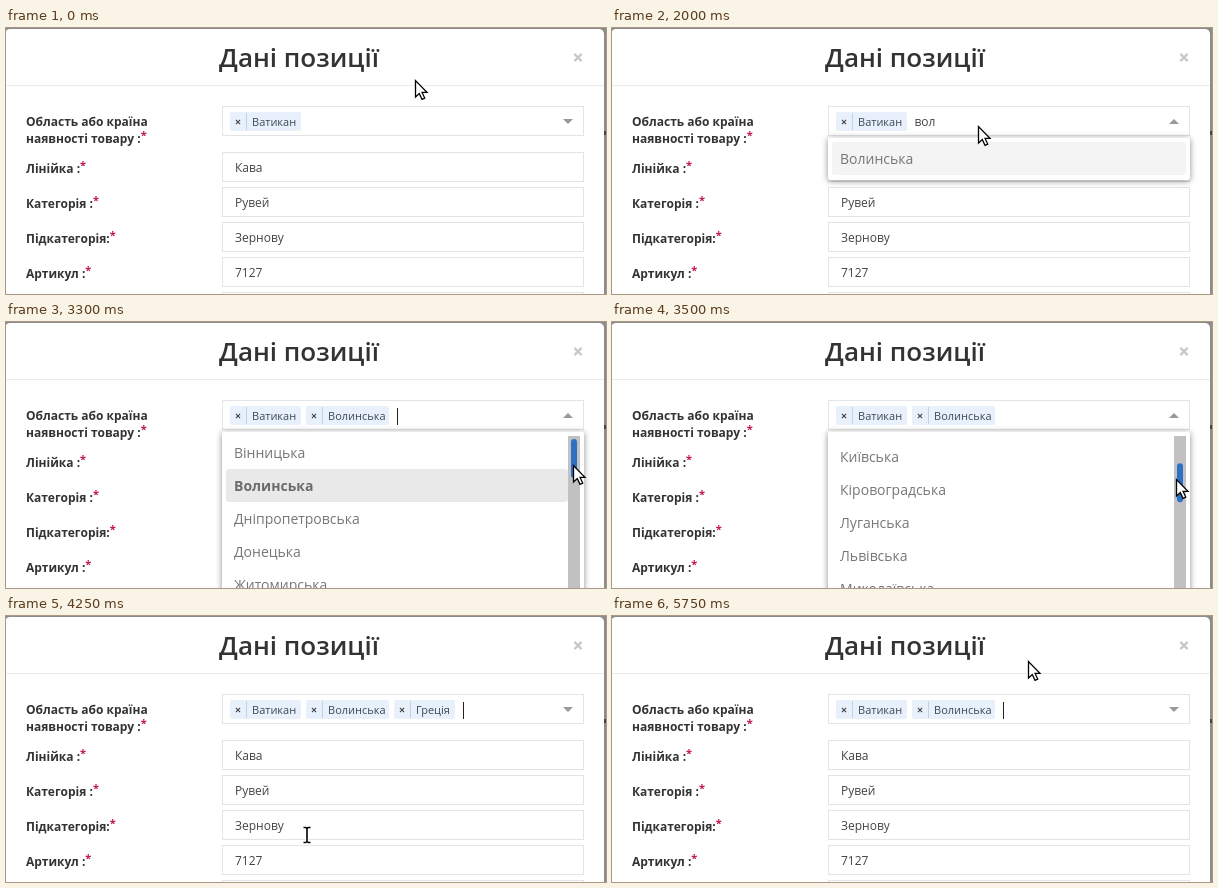
These frames come from a looping animation (600x266 px, 5.95 s). An HTML page:

```html
<!DOCTYPE html>
<html lang="uk">
<head>
<meta charset="utf-8">
<style>
  html, body { margin: 0; width: 100%; height: 100%; overflow: hidden; background: #fff; }
  svg { display: block; width: 600px; height: 266px; }
  text { font-family: "Open Sans", "Noto Sans", sans-serif; white-space: pre; }
  .title { font-size: 26px; font-weight: 600; fill: #333; text-anchor: middle; }
  .label { font-size: 12px; font-weight: 700; fill: #333; }
  .star { font-size: 11px; fill: #c2184b; }
  .value { font-size: 12px; fill: #444; }
  .tag { font-size: 11px; fill: #3c4858; }
  .row { font-size: 14px; fill: #777; }
  .picked { font-weight: 700; fill: #6c6c6c; }
  .field { fill: #fff; stroke: #e3e4e5; }
  .list { fill: #fff; filter: drop-shadow(0 1px 3px rgba(0, 0, 0, .45)); }
</style>
</head>
<body>
<svg viewBox="0 0 600 266">
  <defs><clipPath id="view"><rect x="216" y="114" width="362" height="200"/></clipPath></defs>
  <g id="form"></g>
  <g id="live"></g>
  <g id="pointer"></g>
</svg>
<script>
const LOOP = 5950, STEP = 50, ROW = 33, TOP = 114, THUMB_RATE = 0.0938;

const PLACES = ('Вінницька,Волинська,Дніпропетровська,Донецька,Житомирська,Закарпатська,Запорізька,' +
  'Івано-Франківська,Київська,Кіровоградська,Луганська,Львівська,Миколаївська,Одеська,Полтавська,' +
  'Рівненська,Сумська,Тернопільська,Харківська,Херсонська,Хмельницька,Черкаська,Чернівецька,' +
  'Чернігівська,Австрія,Азербайджан,Албанія,Андорра,Бельгія,Білорусь,Болгарія,' +
  'Боснія і Герцеговина,Ватикан,Греція,Грузія,Данія,Естонія,Ірландія,Ісландія,Іспанія,Італія').split(',');

const TAGS = [['Ватикан', 224, 71], ['Волинська', 300, 83], ['Греція', 388, 61]];

const FIELDS = [['Лінійка :', 'Кава'], ['Категорія :', 'Рувей'],
  ['Підкатегорія:', 'Зернову'], ['Артикул :', '7127'], ['', '']];

// time, x, y
const PATH = [
  [0, 409, 52], [50, 409, 52], [600, 377, 91], [1900, 377, 91], [2200, 334, 119],
  [2450, 334, 119], [2800, 480, 96], [2950, 480, 96], [3300, 567, 143], [3400, 566, 133],
  [3700, 560, 227], [4050, 301, 219], [4350, 301, 219], [4700, 372, 148],
  [5050, 396, 95], [5300, 396, 95], [5500, 416, 45], [LOOP, 416, 45]
];

// from, tag count, open, query
const STATES = [
  [0, 1, false, ''], [650, 1, true, ''], [1350, 1, true, 'в'], [1550, 1, true, 'во'],
  [1750, 1, true, 'вол'], [2400, 2, false, ''], [2950, 2, true, ''],
  [4150, 3, false, ''], [5200, 2, false, '']
];

const $ = id => document.getElementById(id);
const text = (cls, x, y, s) => `<text class="${cls}" x="${x}" y="${y}">${s}</text>`;
const rect = (x, y, w, h, fill, r = 0) =>
  `<rect x="${x}" y="${y}" width="${w}" height="${h}" rx="${r}" fill="${fill}"/>`;
const field = y => `<rect class="field" x="216.5" y="${y}" width="361" height="29"/>`;
const cross = (x, y, r, color, w) =>
  `<path d="M${x - r} ${y - r}l${2 * r} ${2 * r}m0 ${-2 * r}l${-2 * r} ${2 * r}" stroke="${color}" stroke-width="${w}"/>`;
const star = '<tspan class="star" dy="-4">*</tspan>';

function drawForm() {
  let out = rect(0, 0, 600, 266, '#8c8c8c') + rect(-1, 1, 599, 290, '#fff', 5) +
    rect(598, 103, 2, 4, '#444') + rect(0, 57, 598, 1, '#ebebeb') +
    text('title', 293, 39, 'Дані позиції') + cross(572, 29.5, 3.6, '#c8c8c8', 2.2) +
    text('label', 20, 98, 'Область або країна') +
    text('label', 20, 115, 'наявності товару :' + star) + field(78.5);
  FIELDS.forEach(([name, value], i) => {
    const y = 124.5 + 35 * i;
    out += field(y) + text('value', 229, y + 19.5, value);
    if (name) out += text('label', 20, y + 20.5, name + star);
  });
  $('form').innerHTML = out;
}

function cursorAt(t) {
  const i = PATH.findIndex(p => p[0] > t);
  const [t0, x0, y0] = PATH[i - 1], [t1, x1, y1] = PATH[i];
  const k = (t - t0) / (t1 - t0), e = k * k * (3 - 2 * k);
  return { x: x0 + (x1 - x0) * e, y: y0 + (y1 - y0) * e };
}

function scrollAt(t, cur, picked) {
  if (t >= 3700) return 1002;
  if (t >= 3400) return (cur.y - 133) / 94 * 1002;
  return picked > 4 ? picked * ROW : 0;
}

function drawList(t, cur, chosen, query) {
  const rows = PLACES.filter(p => p.toLowerCase().includes(query));
  const picked = rows.findIndex(p => chosen.includes(p));
  const long = rows.length > 6;
  const scroll = long ? scrollAt(t, cur, picked) : 0;
  const w = long ? 342 : 354;
  const hover = query && picked < 0 ? 0
    : t >= 3800 && cur.x < 560 ? Math.floor((cur.y - TOP + scroll) / ROW) : -1;
  let out = `<rect class="list" x="216" y="109.5" width="362" height="${Math.min(rows.length, 6) * ROW + 9.5}" rx="2"/><g clip-path="url(#view)">`;
  rows.forEach((name, i) => {
    const y = TOP + i * ROW - scroll;
    if (y < TOP - ROW || y > 266) return;
    const on = chosen.includes(name);
    if (on) out += rect(220, y, w, ROW, '#e9e9e9', 3);
    else if (i === hover) out += rect(220, y, w, ROW, '#f4f4f4', 3);
    out += text(on ? 'row picked' : 'row', 228, y + 22, name);
  });
  if (long) {
    const held = t >= 3250 && t < 3800;
    out += rect(562, TOP, 12, 200, '#c1c1c1') +
      rect(565, 117 + scroll * THUMB_RATE, 6, 39, held ? '#2f6fc6' : '#7f7f7f', 3);
  }
  return out + '</g>';
}

function drawLive(t, cur, [, count, open, query]) {
  const tags = TAGS.slice(0, count), [, x, w] = tags[count - 1];
  let out = '';
  for (const [name, tx, tw] of tags) {
    out += rect(tx, 84, tw, 19, '#e8f1fb', 2) + cross(tx + 8, 94, 2.1, '#444', 1.1) +
      rect(tx + 16, 85, 1, 17, '#c3d2e0') + text('tag', tx + 22, 98, name);
  }
  if (query) out += text('value', x + w + 7.5, 98, query);
  else if (t >= 650 && (t < 3400 || t >= 4150)) out += rect(x + w + 8, 86, 1, 17, '#222');
  out += `<path d="${open ? 'M557 96h10l-5-5z' : 'M557 91h10l-5 5z'}" fill="#999"/>`;
  if (open) out += drawList(t, cur, tags.map(g => g[0]), query);
  $('live').innerHTML = out;
}

function drawPointer({ x, y }, open) {
  const typing = !open && x > 216 && y > 124 && (y - 124) % 35 < 30;
  const beam = 'M-3.5 -7.5H-1.2L0 -6.5L1.2 -7.5H3.5M0 -6.5V6.5M-3.5 7.5H-1.2L0 6.5L1.2 7.5H3.5';
  const shape = typing
    ? `<path d="${beam}" fill="none" stroke="#fff" stroke-width="3.4"/><path d="${beam}" fill="none" stroke="#000" stroke-width="1.6"/>`
    : '<path d="M.5 .5V17L4.3 13.5L7 19.3L9.7 18.1L7.1 12.4H12z" fill="#fff" stroke="#000" stroke-width="1.3"/>';
  $('pointer').innerHTML = `<g transform="translate(${Math.round(x)} ${Math.round(y)})">${shape}</g>`;
}

let last = -1;
function tick() {
  const t = Math.floor(performance.now() % LOOP / STEP) * STEP;
  if (t !== last) {
    last = t;
    const cur = cursorAt(t);
    const state = STATES.filter(s => s[0] <= t).pop();
    drawLive(t, cur, state);
    drawPointer(cur, state[2]);
  }
  requestAnimationFrame(tick);
}

drawForm();
tick();
</script>
</body>
</html>
```
